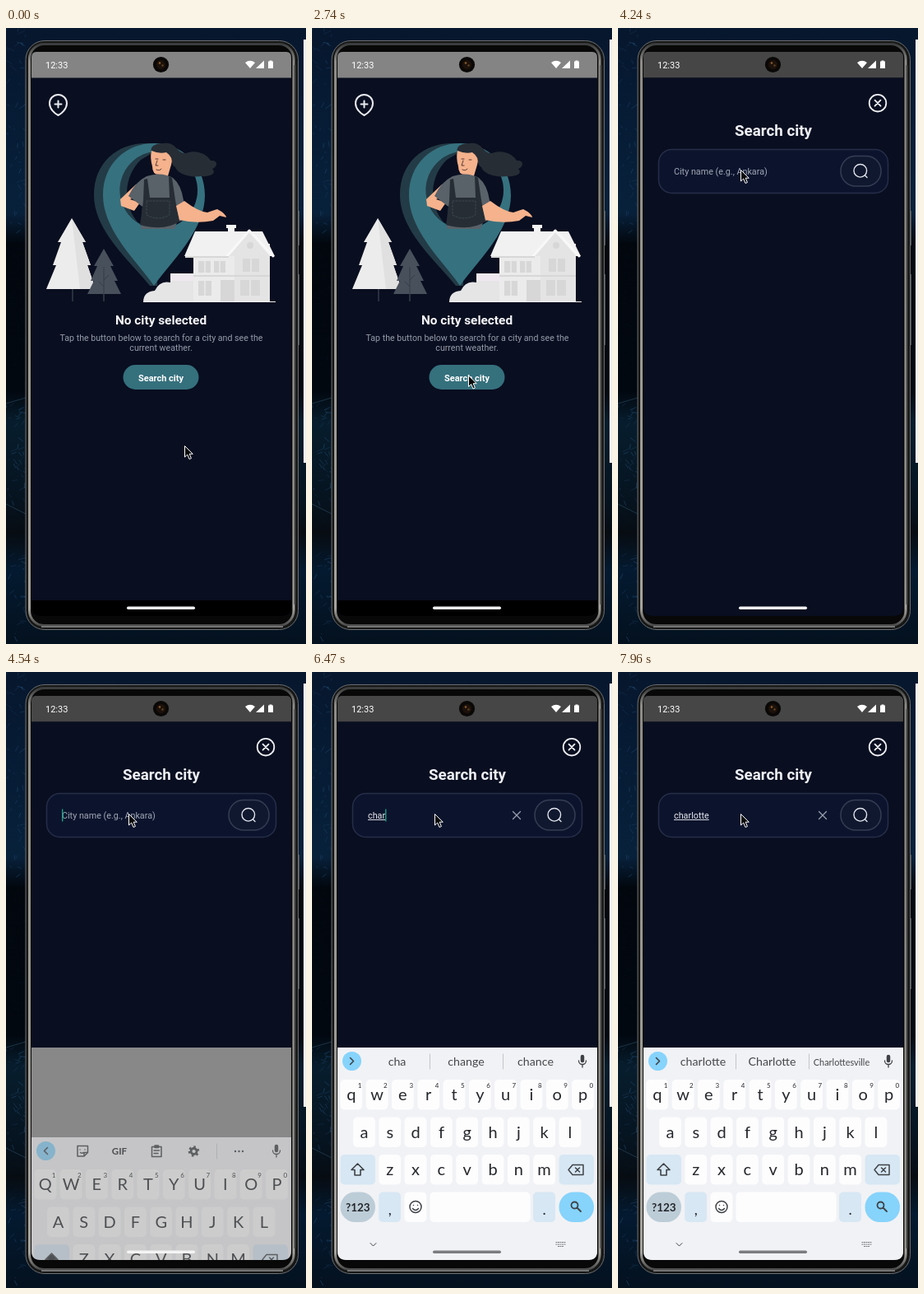
Write an HTML page that moves like this. It is 365 px wide and 748 px high and loops after 8 s.

```html
<!DOCTYPE html>
<html lang="en">
<head>
<meta charset="utf-8">
<title>City search</title>
<style>
html, body { margin: 0; width: 100%; height: 100%; overflow: hidden; background: #030a14; }
svg { display: block; width: 100vw; height: 100vh; font-family: Roboto, sans-serif; }
text { white-space: pre; }
.mid { text-anchor: middle; }
.bold { font-weight: 700; }
.line { fill: none; stroke-linecap: round; stroke-linejoin: round; }
#keyboard { font-family: Lato, sans-serif; fill: #25272b; }
</style>
</head>
<body>
<svg viewBox="0 0 365 748">
  <defs>
    <linearGradient id="night" x2="0" y2="1">
      <stop offset="0" stop-color="#07172d"/><stop offset=".1" stop-color="#061a33"/>
      <stop offset=".3" stop-color="#08213b"/><stop offset=".35" stop-color="#02070e"/>
      <stop offset=".59" stop-color="#020810"/><stop offset=".64" stop-color="#071d2d"/>
      <stop offset=".77" stop-color="#06131f"/><stop offset=".82" stop-color="#070c12"/>
      <stop offset=".88" stop-color="#041a30"/><stop offset="1" stop-color="#04111f"/>
    </linearGradient>
    <linearGradient id="metal" x2="0" y2="1">
      <stop offset="0" stop-color="#3a3b3c"/><stop offset=".03" stop-color="#8d8c88"/>
      <stop offset=".97" stop-color="#a5a39d"/><stop offset="1" stop-color="#4c4c4c"/>
    </linearGradient>
    <clipPath id="screen"><path d="M37 29H341Q347 29 347 36V703Q347 714 336 714H42Q31 714 31 703V36Q31 29 37 29z"/></clipPath>
    <clipPath id="hole"><path d="M130 140H245V222L231 244H139z"/></clipPath>
  </defs>

  <rect width="365" height="748" fill="url(#night)"/>
  <g id="rocks" class="line"></g>
  <rect x="362" y="14" width="3" height="514" fill="#f1f1f1"/>

  <!-- phone body -->
  <path d="M355.500 222v42M355.500 299v86" stroke="#55585b" stroke-width="3"/>
  <rect x="24" y="15.500" width="331.500" height="715" rx="23" fill="#161717" stroke="#6e6f70"/>
  <rect x="28.500" y="19.500" width="321.500" height="706" rx="18" fill="#080808" stroke="url(#metal)" stroke-width="3"/>
  <path d="M43 727H337" stroke="#747474" stroke-width="2"/>
  <path d="M351.500 45V700" stroke="#474747" stroke-width="2"/>

  <g clip-path="url(#screen)">
    <rect x="31" y="29" width="316" height="685" fill="#090e20"/>
    <rect x="31" y="29" width="316" height="31.500" fill="#848484"/>
    <rect x="31" y="695" width="316" height="19" fill="#000"/>

    <g class="line" stroke="#e8eaf0" stroke-width="2">
      <path d="M63.500 106C59 104 53 98 53 91.500a10.500 10.500 0 0 1 21 0C74 98 68 104 63.500 106z"/>
      <path d="M59.500 92.500h8M63.500 88.500v8"/>
    </g>

    <!-- pin -->
    <g id="art">
      <path d="M175 313C152 284 107 247 107 203C107 163 136 140 170 140H184V313z" fill="#233b46"/>
      <path d="M180 313C162 286 118 247 118 203C118 164 147 140 180 140C214 140 242 166 242 203C242 247 200 284 180 313z" fill="#36717f"/>
      <circle cx="186" cy="197" r="47" fill="#090e20"/>
      <path d="M181 150A47 47 0 0 0 161 237A56 56 0 0 1 164 160z" fill="#233b46"/>
      <!-- figure -->
      <path d="M193 140C207 138 208 153 219 152C233 147 245 154 249 161C259 160 257 169 251 171C258 178 244 181 238 180C222 182 209 177 206 169C200 166 203 156 195 155C187 152 181 152 177 151C175 144 180 140 193 140z" fill="#272d35"/>
      <path d="M177 149Q186 153 195 151Q204 157 201 166L196 183H186V178Q178 178 178 168Q175 158 177 149z" fill="#f5b28c"/>
      <path d="M182 159h3M191 160h3M184 161l-2 6h3M183 172q4 2 6-1" class="line" stroke="#583b36"/>
      <g clip-path="url(#hole)">
        <path d="M158 190L139 208L140 216L156 222L163 212L151 208L166 200z" fill="#f5b28c"/>
        <path d="M171 180Q189 174 203 182Q213 190 216 209L219 232L208 236L205 244H164L166 217L149 204Q157 187 171 180z" fill="#596169"/>
        <path d="M172 183L175 206H199L198 180L202 182L206 209L211 235Q193 247 163 239L167 210L168 184z" fill="#262d35"/>
        <path d="M171 210h28v17q-14 8-28 0z" class="line" stroke="#4a525b" stroke-dasharray="2 2" stroke-width=".7"/>
      </g>
      <path d="M207 216L217 210Q234 223 245 224L257 220Q267 225 268 230L260 228L252 234Q231 238 211 233z" fill="#f5b28c"/>
      <!-- trees -->
      <path d="M81 317v15" stroke="#49505c"/>
      <path d="M80 231L97 260H93L103 288H99L109 317H49L61 288H57L67 260H63z" fill="#ececec"/>
      <path d="M80 231L97 260H93L103 288H99L109 317H90z" fill="#e0e0e0"/>
      <path d="M119 268L131 289H127L136 307H132L140 323H99L107 307H103L111 289H107zM118.500 320h1v12h-1z" fill="#48505c"/>
      <path d="M119 290V331M119 306l6-6M119 314l-6-6" stroke="#303844" stroke-width=".8"/>
      <!-- house -->
      <path d="M167 333Q167 320 181 319Q187 306 200 309V298H229V333z" fill="#e5e5e5"/>
      <path d="M200 298h29v9h-29z" fill="#eee8ee"/>
      <path d="M228 262H321V333H228z" fill="#ebebeb"/>
      <path d="M268 239h12v4h-2v17h-8v-17h-2z" fill="#f4f4f4"/>
      <path d="M230 247H312L327 277H217z" fill="#f1f1f1"/>
      <path d="M271 277L296 248L321 277V333H278V277z" fill="#e4e4e4"/>
      <path d="M269 277L296 246L325 277" class="line" stroke="#f8f8f8" stroke-width="3"/>
      <g fill="#d7d7d7">
        <circle cx="297" cy="264" r="4"/>
        <path d="M218 277h53v2h-53zM288 280h20v16h-20zM285 306h24v19h-24zM234 283h15v14h-15zM253 283h14v14h-14zM261 306h17v27h-17zM234 307h16v18h-16zM228 300h93v2h-93z"/>
      </g>
      <path d="M298 280v16M297 306v19M242 283v14M260 283v14M242 307v18" stroke="#f3f3f3"/>
      <path d="M167 332.500H328" stroke="#f0f0f0"/>
    </g>

    <g class="mid">
      <text class="bold" x="188.500" y="360" font-size="15.400" fill="#f4f5f8">No city selected</text>
      <g font-size="10.650" fill="#949caa">
        <text x="189" y="380">Tap the button below to search for a city and see the</text>
        <text x="188.500" y="392">current weather.</text>
      </g>
      <rect x="142.500" y="409" width="92" height="30" rx="15" fill="#35707d"/>
      <text class="bold" x="188.500" y="428.500" font-size="11" fill="#fff">Search city</text>
    </g>

    <rect id="shade" x="31" y="29" width="316" height="685"/>

    <g id="sheet">
      <rect x="31" y="60.500" width="316" height="655" fill="#090e20"/>
      <g class="line" stroke="#eef0f5" stroke-width="1.800">
        <circle cx="316" cy="91.200" r="10.300"/>
        <path d="M312.500 87.700l7 7m0-7l-7 7"/>
      </g>
      <text class="mid bold" x="189" y="131" font-size="18.800" fill="#eef0f6">Search city</text>
      <rect x="49.500" y="147.500" width="279" height="53" rx="16" fill="#0c142d" stroke="#252d48" stroke-width="1.500"/>
      <rect x="271" y="155.500" width="49" height="36.500" rx="18" fill="#10182f" stroke="#343d53" stroke-width="1.500"/>
      <g class="line" stroke="#dfe3eb" stroke-width="1.400">
        <circle cx="294.800" cy="173.300" r="7.800"/>
        <path d="M300.500 179l2.500 2.500"/>
      </g>
      <path id="clear" class="line" d="M244.500 169.500l9 9m0-9l-9 9" stroke="#9aa1b0" stroke-width="1.200"/>
      <text id="hint" x="68" y="177.800" font-size="10.780" fill="#a0a7b7">City name (e.g., Ankara)</text>
      <text id="typed" x="68" y="177.800" font-size="10.800" fill="#e9ebf1"></text>
      <path id="under" stroke="#d5d8e0"/>
      <rect id="caret" y="166.500" width="1.300" height="15" fill="#16a98a"/>
    </g>

    <g id="panel">
      <rect x="31" y="456" width="316" height="258" fill="#888"/>
      <g id="keyboard"></g>
    </g>
    <rect id="handle" x="147" y="702.500" width="83" height="3.500" rx="1.700"/>

    <!-- status bar -->
    <text x="48" y="48.500" font-size="11" fill="#fff">12:33</text>
    <g fill="#fff">
      <path d="M291 42Q297 37.500 303 42L297 49zM314 39.500V49H304zM319 40.500h1.500v-1h3v1h1.500V49h-6z"/>
    </g>
    <circle cx="188.500" cy="44.500" r="9.600" fill="#0a0807"/>
    <circle cx="188.500" cy="44.500" r="5.500" fill="#1c120b"/>
    <circle cx="187" cy="42.500" r="1.300" fill="#8a5a2c"/>
    <circle cx="190.500" cy="45.500" r="1.200" fill="#62401f"/>
  </g>

  <path id="cursor" d="M.500 .500V14l3.200-3 2.300 5.500 2.400-1L6.200 10.200H10.300z" fill="#090909" stroke="#fff"/>
</svg>

<script>
const $ = id => document.getElementById(id);
const LOOP = 8000, PITCH = 31.3;

// Each row: time, then values; held moves advance on a 150 ms tick.
const pointer = [[340, 217, 507], [640, 190, 450], [790, 165, 390], [940, 156, 365], [1090, 175, 385],
  [1240, 192, 415], [1390, 197, 430], [1990, 197, 430], [2140, 191, 421], [2590, 191, 421],
  [2740, 190, 421.500], [3640, 190, 421.500], [4240, 149, 172]];
const sheetMove = [[3040, 654, 0], [3190, 370, .2], [3340, 93, .36], [3490, 0, .47]];
const panelMove = [[4390, 258, 0], [4540, 109, .58], [4690, 12, .92], [4840, 0, 1]];
const typing = [[0, ""], [5130, "c"], [5720, "ch"], [6040, "cha"], [6340, "char"], [6490, "charl"],
  [6760, "charlo"], [7060, "charlot"], [7210, "charlott"], [7360, "charlotte"]];
const guesses = [[0, "", "", ""], [5420, "c", "can", "cool"], [5890, "ch", "change", "check"],
  [6190, "cha", "change", "chance"], [6490, "char", "charge", "chart"], [6640, "charl", "Charlotte", "Charles"],
  [6910, "charlo", "Charlotte", "Charlo"], [7210, "charlot", "Charlotte", "Charlo"],
  [7510, "charlotte", "Charlotte", "Charlottesville"]];

const held = (rows, t) => rows.findLast(r => r[0] <= t).slice(1);
function tween(rows, t) {
  const i = rows.findIndex(r => r[0] > t);
  if (i < 0) return rows.at(-1).slice(1);
  if (!i) return rows[0].slice(1);
  const a = rows[i - 1], b = rows[i], k = (t - a[0]) / (b[0] - a[0]);
  return a.slice(1).map((v, n) => v + (b[n + 1] - v) * k);
}
const show = (id, on) => $(id).setAttribute("visibility", on ? "visible" : "hidden");
const move = (id, x, y) => $(id).setAttribute("transform", `translate(${x} ${y})`);

function buildRocks() {
  let seed = 7, out = "";
  const rnd = () => (seed = seed * 16807 % 2147483647) / 2147483647;
  for (let i = 0; i < 150; i++) {
    const y = rnd() * 748, x = rnd() * 24;
    const dark = y > 250 && y < 445 || y > 585 && y < 640;
    out += `<path d="M${x} ${y}l${rnd() * 12 - 3} ${rnd() * 12 - 6}" stroke="${dark ? "#06111d" : "#245079"}" opacity="${.2 + rnd() * .35}"/>`;
  }
  $("rocks").innerHTML = out + '<path d="M0 456L24 449M0 578L24 590" stroke="#2d4e63" opacity=".6"/>';
}

function buildKeyboard() {
  const box = (x, y, w, fill = "#fdfdfe", r = 5) =>
    `<rect x="${x}" y="${y}" width="${w}" height="36.500" rx="${r}" fill="${fill}"/>`;
  const text = (x, y, size, s, cls = "") =>
    `<text class="mid ${cls}" x="${x}" y="${y}" font-size="${size}">${s}</text>`;
  const icon = (d, w = 1.500, more = "") =>
    `<path class="line" d="${d}" stroke="#3f4246" stroke-width="${w}" ${more}/>`;
  const blue = "#d7e7f4";
  let out = '<rect x="31" y="456" width="316" height="258" fill="#f1f2f5"/>';

  [["qwertyuiop", 47.800, 495], ["asdfghjkl", 63.500, 540.500], ["zxcvbnm", 94.800, 586]].forEach(([row, x0, y], r) =>
    [...row].forEach((c, i) => {
      const x = x0 + PITCH * i;
      out += box(x - 13.400, y, 26.800) + text(x, y + 25, 20, c, "letter");
      if (!r) out += text(x + 10.300, y + 9.500, 8, (i + 1) % 10);
    }));

  out += box(34.500, 586, 42.500, blue) + box(300.500, 586, 42.500, blue)
    + box(34.500, 631.500, 42.500, "#bccdd8", 18) + box(81.200, 631.500, 26.800, blue) + box(112.500, 631.500, 26.800)
    + box(143.500, 631.500, 122, "#fdfdfe") + box(269, 631.500, 27, blue) + box(300.500, 631.500, 42.500, "#86d3fc", 18)
    + text(55.800, 654.500, 13.500, "?123", "bold") + text(94.800, 659, 18, ",") + text(282.500, 659, 18, ".")
    + icon("M55.500 597L63 604.500H59V611H52V604.500H48z", 1.600, 'id="shift"')
    + icon("M312 604.500l5-6h13v12h-13zM320.500 602l5 5m0-5l-5 5")
    + icon("M119 649.500a7 7 0 1 0 14 0a7 7 0 1 0-14 0M123.500 647.500v.1M128.500 647.500v.1M122.500 651.500q3.500 4 7 0")
    + icon("M315.500 647.500a4 4 0 1 0 8 0a4 4 0 1 0-8 0M322.500 650.500l4.500 4.500", 1.800)
    + icon("M71 693.500l3.500 3.500 3.500-3.500", 1)
    + icon("M297 692.500h12M297 695h12M299.500 697.500h7", 1.200, 'stroke-dasharray="1 1.500" opacity=".7"')
    + '<circle cx="48.500" cy="472.500" r="11.500" fill="#86d3fc"/>'
    + icon("M46.500 468.500l4 4-4 4", 1.600, 'id="more"') + icon("M50.500 468.500l-4 4 4 4", 1.600, 'id="less"')
    + icon("M329 467v5", 4.500) + icon("M324.500 472a4.500 4.500 0 0 0 9 0M329 477v3", 1.300);

  // toolbar, then suggestions
  out += '<g id="tools">'
    + icon("M87 466.500h12.500v8l-4.500 4.500h-8zM95 479v-4.500h4.500M90 471v.1M96 471v.1M90.500 474.500q2 1.500 3.500 0")
    + text(138, 477, 11.500, "GIF", "bold")
    + icon("M177.500 467.500h11.500v12h-11.500zM181 466h4.500v2.500h-4.500zM180 472h6.500M180 475.500h5")
    + icon("M225 473a3.500 3.500 0 1 0 7 0a3.500 3.500 0 1 0-7 0", 2.800)
    + icon("M223 473a5.500 5.500 0 1 0 11 0a5.500 5.500 0 1 0-11 0", 2.500, 'stroke-dasharray="2.500 3.250" style="stroke-linecap:butt"')
    + icon("M256.500 464v18", 1, 'opacity=".2"')
    + icon("M279 473v.1M283.500 473v.1M288 473v.1", 2.400) + "</g>"
    + '<g id="words" fill="#44474b">' + icon("M143.500 464v18M232.500 464v18", 1, 'opacity=".25"')
    + [103.500, 187.500, 272].map(x => text(x, 478, 14.200, "", "word")).join("") + "</g>";
  $("keyboard").innerHTML = out;
}

buildRocks();
buildKeyboard();
const letters = [...document.querySelectorAll(".letter")];
const words = [...document.querySelectorAll(".word")];

function render(t) {
  const tick = Math.floor((t - 40) / 150) * 150 + 40;
  move("cursor", ...tween(pointer, tick));

  const [sheetY, dim] = tween(sheetMove, tick);
  move("sheet", 0, sheetY);
  $("shade").setAttribute("opacity", dim);

  const [keysY, fade] = tween(panelMove, tick);
  move("keyboard", 0, keysY);
  $("keyboard").setAttribute("opacity", fade);
  show("panel", t >= 4540);
  $("handle").setAttribute("fill", t >= 4690 ? "#7b7c80" : "#f4f4f4");

  const [word] = held(typing, t);
  $("typed").textContent = word;
  const end = 68 + (word ? $("typed").getComputedTextLength() : 0);
  $("under").setAttribute("d", `M68 179.500H${end}`);
  $("caret").setAttribute("x", end);
  show("caret", t >= 4540 && t < 7960);
  show("hint", !word);
  show("under", word);
  show("clear", word);

  const lower = t >= 5420;
  for (const l of letters) {
    l.textContent = lower ? l.textContent.toLowerCase() : l.textContent.toUpperCase();
  }
  $("shift").setAttribute("fill", lower ? "none" : "#25272b");
  $("shift").style.fill = lower ? "none" : "#25272b";
  // hidden children of a hidden panel need their own state
  const up = t >= 4540;
  show("tools", up && !lower);
  show("less", up && !lower);
  show("more", lower);
  show("words", lower);
  held(guesses, t).forEach((s, i) => {
    words[i].textContent = s;
    words[i].setAttribute("font-size", s.length > 10 ? 10.900 : 14.200);
  });
}

const start = performance.now();
function frame() {
  render((performance.now() - start) % LOOP);
  requestAnimationFrame(frame);
}
frame();
</script>
</body>
</html>
```
